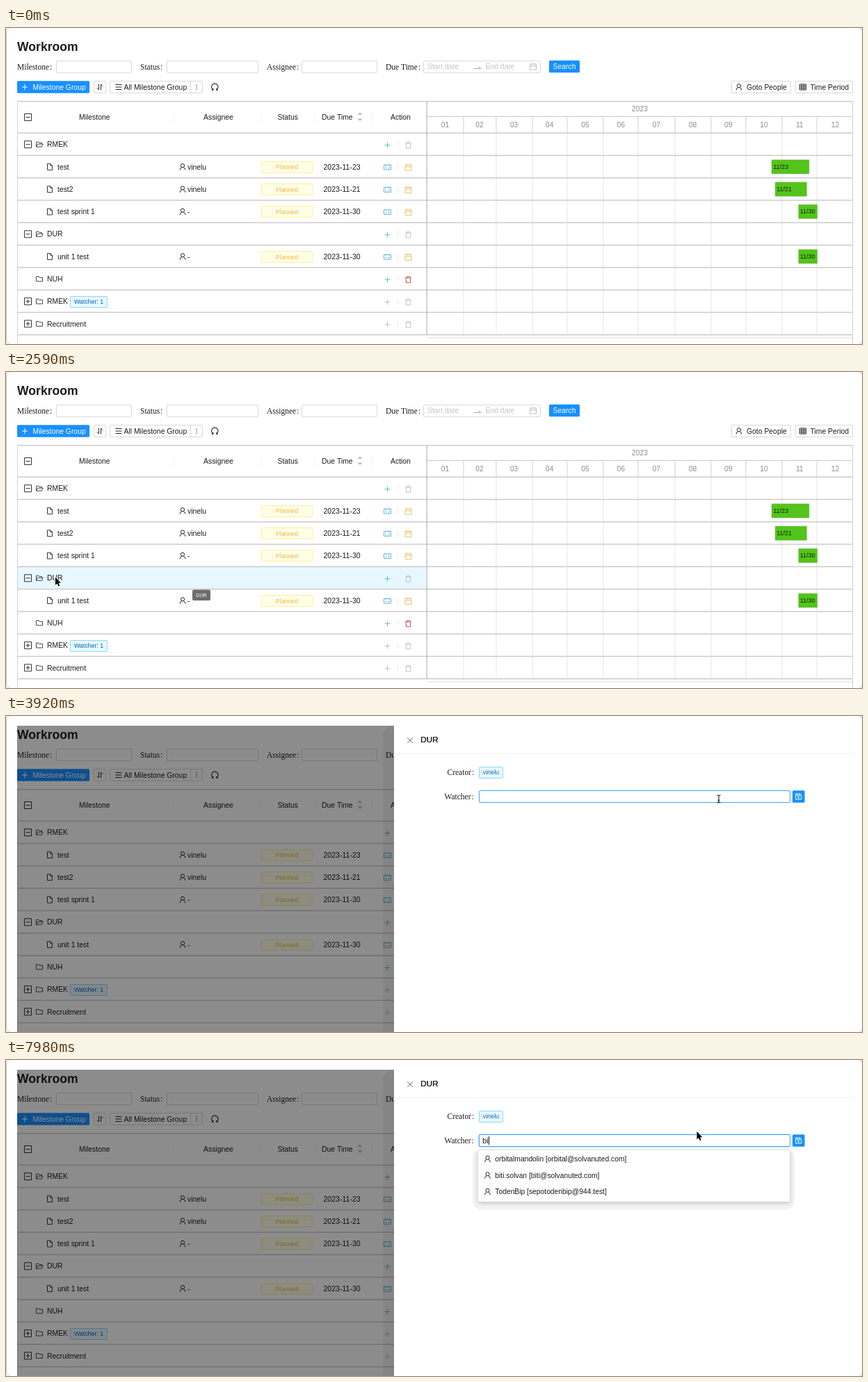
Recreate the animation shown at these times as an HTML page with a canvas. Size 1231 by 455 pixels, loop 8 s.

```html
<!DOCTYPE html>
<html lang="en">
<head>
<meta charset="utf-8">
<title>Milestones</title>
<style>
  html, body { margin: 0; width: 100%; height: 100%; overflow: hidden; background: #fff; }
  canvas { display: block; width: 1231px; height: 455px; }
</style>
</head>
<body>
<canvas id="stage" width="1231" height="455"></canvas>
<script>
const W = 1231, H = 455, LOOP = 8000, STEP = 70;
const g = document.getElementById('stage').getContext('2d');
const SANS = '"Liberation Sans", Arial, sans-serif';
const SERIF = '"Liberation Serif", Georgia, serif';
const INK = '#1c1c1c', BLUE = '#1890ff', SKY = '#55aedb', LINE = '#c8c8c8', EDGE = '#d9d9d9', GREY = '#bcbcbc';

// Table geometry
const LEFT = 16, RIGHT = 1218, SPLIT = 605, HEAD = 105, BODY = 151, PITCH = 32.28;
const DAY = (RIGHT - SPLIT) / 365;
const rowY = i => BODY + PITCH * (i + 0.5) + 0.5;

const clamp = v => Math.max(0, Math.min(1, v));
const lerp = (a, b, p) => a + (b - a) * p;
const smooth = p => p * p * (3 - 2 * p);

function text(s, x, y, { size = 10.4, color = INK, weight = '', align = 'left', face = SANS } = {}) {
  g.font = `${weight} ${size}px ${face}`;
  g.fillStyle = color;
  g.textAlign = align;
  g.fillText(s, x, y + size * 0.35);
  return g.measureText(s).width;
}

function label(s, x, y) {
  const style = { size: 11.5, face: SERIF };
  text(':', x + text(s, x, y, style) + 1, y, style);
}

function rect(x, y, w, h, fill) {
  g.fillStyle = fill;
  g.fillRect(x, y, w, h);
}

function fillBox(x, y, w, h, fill, r = 1.5) {
  g.beginPath();
  g.roundRect(x, y, w, h, r);
  g.fillStyle = fill;
  g.fill();
}

// Outlined box with its border on whole pixels
function box(x, y, w, h, fill, stroke, r = 1.5) {
  g.beginPath();
  g.roundRect(Math.round(x) + 0.5, Math.round(y) + 0.5, w - 1, h - 1, r);
  g.fillStyle = fill;
  g.fill();
  g.strokeStyle = stroke;
  g.lineWidth = 1;
  g.stroke();
}

function icon(path, x, y, color = '#333', width = 1) {
  g.save();
  g.translate(x, y);
  g.strokeStyle = color;
  g.lineWidth = width;
  g.stroke(new Path2D(path));
  g.restore();
}

const ICONS = {
  plus: 'M-4 0h8M0-4v8',
  cross: 'M-4-4l8 8M4-4l-8 8',
  minusBox: 'M-5-5h10v10h-10zM-3 0h6',
  plusBox: 'M-5-5h10v10h-10zM-3 0h6M0-3v6',
  folder: 'M-4.5 3.5v-7h3.5l1 1.4h4.5v5.6z',
  folderOpen: 'M3.5-.5v-1.8h-3.5l-1-1.2h-3.5v7l2-4h7.7l-1.8 4h-7.9',
  file: 'M.8-4.5h-4.3v9h7v-6.3zv2.7h2.7',
  person: 'M-2.6-1.8a2.6 2.6 0 1 1 5.2 0a2.6 2.6 0 1 1-5.2 0M-4 4.6q.4-3.2 2.8-3.8M4 4.6q-.4-3.2-2.8-3.8',
  calendar: 'M-4.5-3.5h9v8h-9zM-4.5-.8h9M-2.2-5v2.5M2.2-5v2.5',
  schedule: 'M-5-3.2h10v6.7h-10zM-2.5-4.5v2.5M2.5-4.5v2.5M-3 1h2M.5 1l1 1l2-2.4',
  trash: 'M-4.3-2.6h8.6M-1.8-2.6v-1.9h3.6v1.9M-3.3-2.6l.3 7h6l.3-7',
  range: 'M-5 1.5h10l-3.5-2.5',
  sort: 'M-1.5-4.5v8.5l-2.5-2.5M1.5 4.5v-8.5l2.5 2.5',
  menu: 'M-4.5-3.5h9M-4.5 0h9M-4.5 3.5h9',
  reload: 'M-2.6 3.9a4.7 4.7 0 1 1 5.2 0M-4.4 4.4h2v-2M4.4 4.4h-2v-2',
  grid: 'M-4.5-4h9v8h-9zM-4.5-1.3h9M-4.5 1.4h9M-1.5-4v8M1.5-4v8',
  save: 'M-4-4h6.2l1.8 1.8v6.2h-8zM-2-4v2.5h4v-2.5M-1 1.2a1 1 0 1 0 2 0a1 1 0 1 0-2 0',
  beam: 'M-2.5-5.5l2.5.9l2.5-.9M-2.5 5.8l2.5-.9l2.5.9M0-4.6v9.5M-1.5 2h3'
};

function tag(s, x, y, w, yellow) {
  const [fill, edge, ink] = yellow ? ['#feffe6', '#fff09a', '#efb640'] : ['#e6f7ff', '#91d5ff', '#0f62b0'];
  box(x, y - 8, w, 17, fill, edge);
  text(s, x + w / 2, y + 0.4, { size: 8.8, color: ink, align: 'center' });
}

const rows = [
  { name: 'RMEK', open: true },
  { name: 'test', who: 'vinelu', from: '2023-10-23', due: '2023-11-23' },
  { name: 'test2', who: 'vinelu', from: '2023-10-26', due: '2023-11-21' },
  { name: 'test sprint 1', who: '-', from: '2023-11-15', due: '2023-11-30' },
  { name: 'DUR', open: true },
  { name: 'unit 1 test', who: '-', from: '2023-11-15', due: '2023-11-30' },
  { name: 'NUH', leaf: true },
  { name: 'RMEK', dim: true, watch: 'Watcher: 1' },
  { name: 'Recruitment', dim: true }
];

function filters() {
  const y = 55.5;
  let x = LEFT;
  for (const [name, left, width] of [['Milestone', 72, 109], ['Status', 231, 132], ['Assignee', 425, 109], ['Due Time', 600, 169]]) {
    label(name, x, y);
    box(left, 47, width, 18, '#fff', EDGE);
    x = left + width + 12;
  }
  text('Start date', 606, y, { color: '#c4c4c4' });
  icon(ICONS.range, 678, 57, '#aaa');
  text('End date', 689.5, y, { color: '#c4c4c4' });
  icon(ICONS.calendar, 758, y, GREY);
  fillBox(x, 46.7, 44, 17.6, BLUE);
  text('Search', x + 22, y, { color: '#fff', align: 'center' });
}

function button(x, w, path, s = '', dx = 11, tx = 21) {
  box(x, 76, w, 18, '#fff', EDGE);
  icon(path, x + dx, 85, '#222');
  text(s, x + tx, 85);
}

function toolbar() {
  fillBox(LEFT, 76.2, 104, 17.6, BLUE);
  icon(ICONS.plus, 27, 85, '#fff');
  text('Milestone Group', 38.5, 85, { color: '#fff' });
  button(126, 18, ICONS.sort, '', 9);
  button(149, 134, ICONS.menu, 'All Milestone Group', 13, 20.5);
  rect(265, 77, 1, 16, EDGE);
  for (let i = -1; i <= 1; i++) rect(273.4, 84.5 + 3 * i, 1.2, 1.2, '#222');
  icon(ICONS.reload, 300.3, 84.8, '#222', 1.1);
  button(1043, 86, ICONS.person, 'Goto People', 11, 22);
  button(1135, 83, ICONS.grid, 'Time Period', 11, 21.5);
}

function tableHead() {
  const y = 128.5;
  icon(ICONS.minusBox, 31.5, y);
  const heads = { Milestone: 105, Assignee: 284, Status: 390.5, 'Due Time': 454, Action: 553 };
  for (const s in heads) text(s, heads[s], y);
  for (const x of [241, 367, 443, 526]) rect(x, 122, 1, 13, '#f0f0f0');
  g.fillStyle = GREY;
  for (const s of [-1, 1]) {
    g.beginPath();
    for (const k of [-1, 0, 1]) g.lineTo(509 + 3.5 * k, y - 0.8 + s * (k ? 2.6 : 6.2));
    g.fill();
  }
}

function tableRow(r, i, hover) {
  const y = rowY(i);
  if (hover) rect(17, y - 15.8, SPLIT - 18, 31.4, '#e6f7ff');
  rect(563, y - 4.5, 1, 9, '#ececec');
  if (r.due) {
    icon(ICONS.file, 63, y);
    text(r.name, 74, y);
    icon(ICONS.person, 254, y, '#222');
    text(r.who, 261, y);
    tag('Planned', 367, y, 74, true);
    text(r.due, 456.5, y, { size: 10.55 });
    icon(ICONS.schedule, 548.5, y + 0.6, SKY, 0.9);
    icon(ICONS.calendar, 578.5, y + 0.8, '#e9bd5a', 0.9);
  } else {
    if (!r.leaf) icon(r.open ? ICONS.minusBox : ICONS.plusBox, 31.5, y);
    icon(r.open ? ICONS.folderOpen : ICONS.folder, 48, y, '#333', 0.9);
    text(r.name, 59, y);
    if (r.watch) tag(r.watch, 92, y, 54);
    icon(ICONS.plus, 548.5, y + 1, r.dim ? GREY : SKY, 0.9);
    icon(ICONS.trash, 578.5, y + 1, r.leaf ? '#b5443c' : GREY, 0.9);
  }
}

function chart() {
  const style = { color: '#8c8c8c', align: 'center', size: 10.3 };
  text('2023', (SPLIT + RIGHT) / 2, 116.8, style);
  let x = SPLIT + 0.5;
  for (let m = 1; m <= 12; m++) {
    const w = DAY * new Date(2023, m, 0).getDate();
    text(String(m).padStart(2, '0'), x + w / 2, 139, style);
    x += w;
    if (m < 12) {
      rect(Math.round(x) - 0.5, 128, 1, BODY - 128, '#d0d0d0');
      rect(Math.round(x) - 0.5, BODY, 1, 291, '#e6e6e6');
    }
  }
  rect(SPLIT, 127, RIGHT - SPLIT, 1, LINE);
  rect(SPLIT, 445.5, RIGHT - SPLIT, 1, '#dedede');
}

// Left edge of a date on the chart
const dateX = s => SPLIT + 0.7 + DAY * (Date.parse(s) - Date.parse('2023-01-01')) / 864e5;

function bar(r, i) {
  const x = dateX(r.from), w = dateX(r.due) + DAY - x, y = rowY(i);
  fillBox(x - 0.7, y - 10.9, w + 1.4, 21.6, 'rgba(110,130,80,.3)', 1);
  rect(x, y - 10, w, 20, '#52c41a');
  text(r.due.slice(5).replace('-', '/'), x + 2, y - 0.3, { size: 9, color: '#10220a' });
}

function page(hoverRow) {
  text('Workroom', LEFT, 26.4, { size: 17.6, weight: 'bold' });
  filters();
  toolbar();
  chart();
  rows.forEach((r, i) => tableRow(r, i, i === hoverRow));
  tableHead();
  rect(LEFT, HEAD, RIGHT - LEFT, 1.3, LINE);
  for (let i = 0; i <= rows.length; i++) rect(LEFT, BODY - 0.5 + PITCH * i, RIGHT - LEFT, 1.4, LINE);
  for (const x of [LEFT, RIGHT - 1]) rect(x, HEAD, 1, H, '#cfcfcf');
  rect(SPLIT - 0.5, HEAD, 1.5, 337, '#c2c2c2');
  rows.forEach((r, i) => r.due && bar(r, i));
}

function tooltip(alpha, scale) {
  g.save();
  g.globalAlpha = alpha;
  g.translate(281, 321.3);
  g.scale(scale, scale);
  fillBox(-13, -7.8, 26, 15.6, '#6c6c6c', 2);
  text('DUR', 0, 0.2, { size: 7.2, color: '#fff', align: 'center' });
  g.restore();
}

function drawer(left, focus, glow, typed, caret) {
  fillBox(left - 16, 14, 40, H, 'rgba(0,0,0,.05)', [16, 0, 0, 0]);
  rect(left, 14, W, H, '#fff');
  rect(left, 53.5, W, 1, '#f0f0f0');
  icon(ICONS.cross, left + 23, 35, '#777');
  for (const dx of [0, 0.3]) text('DUR', left + 38 + dx, 34, { size: 11.8 });
  label('Creator', left + 76.5, 81);
  tag('vinelu', left + 122, 81, 35);
  label('Watcher', left + 72.5, 116);
  if (glow) fillBox(left + 121, 106, 449, 20, 'rgba(24,144,255,.22)', 2.5);
  box(left + 122, 107, 448, 18, '#fff', focus ? '#3fa2f7' : EDGE);
  const w = typed ? text(typed, left + 127, 116, { size: 11.3 }) : 0;
  if (caret) rect(left + 127.2 + w, 110, 1, 12, '#111');
  fillBox(left + 573, 107.2, 17.6, 17.6, BLUE);
  icon(ICONS.save, left + 581.7, 116, '#fff');
}

// Name and mailbox of everyone who can be picked
const people = [
  'calmtablestroll vkna', 'Zoen zoen', 'Vopi_Zu vopi', 'Moi_Fi moi', 'orbitalmandolin orbital',
  'vinelu vinelu', 'tidewarp noce', 'loi@solvanuted.com loi', 'bnudil bredona', 'biti.solvan biti',
  'nudobe nudobe', 'Bluso bluso', 'vebon vebon', 'bridoeworbu bridoe', 'TodenBip sepotodenbip@944.test'
].map(s => {
  const [name, mail] = s.split(' ');
  return `${name.replace('_', ' ')} [${mail.includes('@') ? mail : mail + '@solvanuted.com'}]`;
});

function dropdown(query, p) {
  const items = people.filter(s => s.toLowerCase().includes(query)).slice(0, 8);
  const gap = 23.5, h = items.length * gap + 3.5;
  g.save();
  g.globalAlpha = p;
  g.translate(0, 130);
  g.scale(1, lerp(0.8, 1, p));
  fillBox(671, -2, 463, h + 14, '#f4f4f4', 13);
  g.shadowColor = 'rgba(0,0,0,.22)';
  g.shadowBlur = 6;
  g.shadowOffsetY = 2;
  fillBox(679, 0, 448, h, '#fff');
  g.shadowColor = 'transparent';
  items.forEach((s, i) => {
    const y = gap * (i + 0.5) + 0.8;
    icon(ICONS.person, 692.5, y, '#222');
    text(s, 703.3, y, { size: 10.3 });
  });
  if (items.length === 8) fillBox(1121, 1, 6, h * 8 / (query ? 16.4 : 34.5), '#7b7b7b', 2);
  g.restore();
}

function arrow(x, y) {
  const shape = new Path2D('M0 0v11.3l2.6-2.3l1.8 4l1.8-.8l-1.7-3.9h3.5z');
  g.save();
  g.translate(x, y);
  g.strokeStyle = '#fff';
  g.lineWidth = 1.6;
  g.lineJoin = 'round';
  g.stroke(shape);
  g.fillStyle = '#000';
  g.fill(shape);
  g.restore();
}

// Eased move between two points, lifted in the middle
function glide(t, start, end, a, b, lift = 0) {
  const p = smooth(clamp((t - start) / (end - start)));
  return { x: lerp(a[0], b[0], p), y: lerp(a[1], b[1], p) - lift * Math.sin(Math.PI * p) };
}

const ENTER = 350, CLICK = 2596, HOVER = 3850, OPEN = 4410, FOCUS = 4460, TYPE1 = 6370, TYPE2 = 6520, WAKE = 7630;

function pointer(t) {
  const button = [420, 92], header = [250, 128], name = [71, 295.5], field = [1025, 119.3];
  if (t < ENTER || t >= TYPE1 && t < WAKE) return null;
  if (t < 1190) return glide(t, ENTER, 1120, button, header);
  if (t < 3080) return glide(t, 1120, 1960, header, name);
  if (t < TYPE1) return { ...glide(t, 3010, HOVER, name, field, 40), beam: t >= HOVER };
  return glide(t, 7700, 7980, [1010, 106], [993.5, 103], 25);
}

const typedAt = t => 'bi'.slice(0, (t >= TYPE1) + (t >= TYPE2));

// The caret blink restarts at focus and at each key
function caretOn(t) {
  const since = [TYPE2, TYPE1, FOCUS].find(k => t >= k);
  return since !== undefined && (t - since) % 1060 < 530;
}

function draw(time) {
  const t = Math.floor(time / STEP) * STEP;
  const slide = 1 - Math.pow(1 - clamp((t - CLICK) / 300), 3.575);
  const at = pointer(t);
  const hover = at && !slide && at.y > BODY ? Math.floor((at.y - BODY) / PITCH) : -1;

  rect(0, 0, W, H, '#fff');
  page(hover);
  if (slide) {
    g.save();
    g.beginPath();
    g.rect(LEFT, 14, RIGHT + 1 - LEFT, H);
    g.clip();
    rect(0, 0, W, H, `rgba(0,0,0,${0.45 * slide})`);
    drawer(Math.round(lerp(1219, 557.7, slide)), t >= HOVER, t >= 4830, typedAt(t), caretOn(t));
    g.restore();
  }
  if (t >= 2030 && t < 2730) slide ? tooltip(0.3, 0.93) : tooltip(1, 1);
  if (t >= OPEN) dropdown(typedAt(t - 60), smooth(clamp((t - OPEN) / 200)));
  g.beginPath();
  g.roundRect(0.5, -0.5, W, H + 1, 6);
  g.strokeStyle = '#c4c4c4';
  g.lineWidth = 1;
  g.stroke();
  if (at) at.beam ? icon(ICONS.beam, at.x, at.y, '#111', 1.1) : arrow(at.x, at.y);
}

function loop() {
  draw(performance.now() % LOOP);
  requestAnimationFrame(loop);
}
loop();
</script>
</body>
</html>
```
